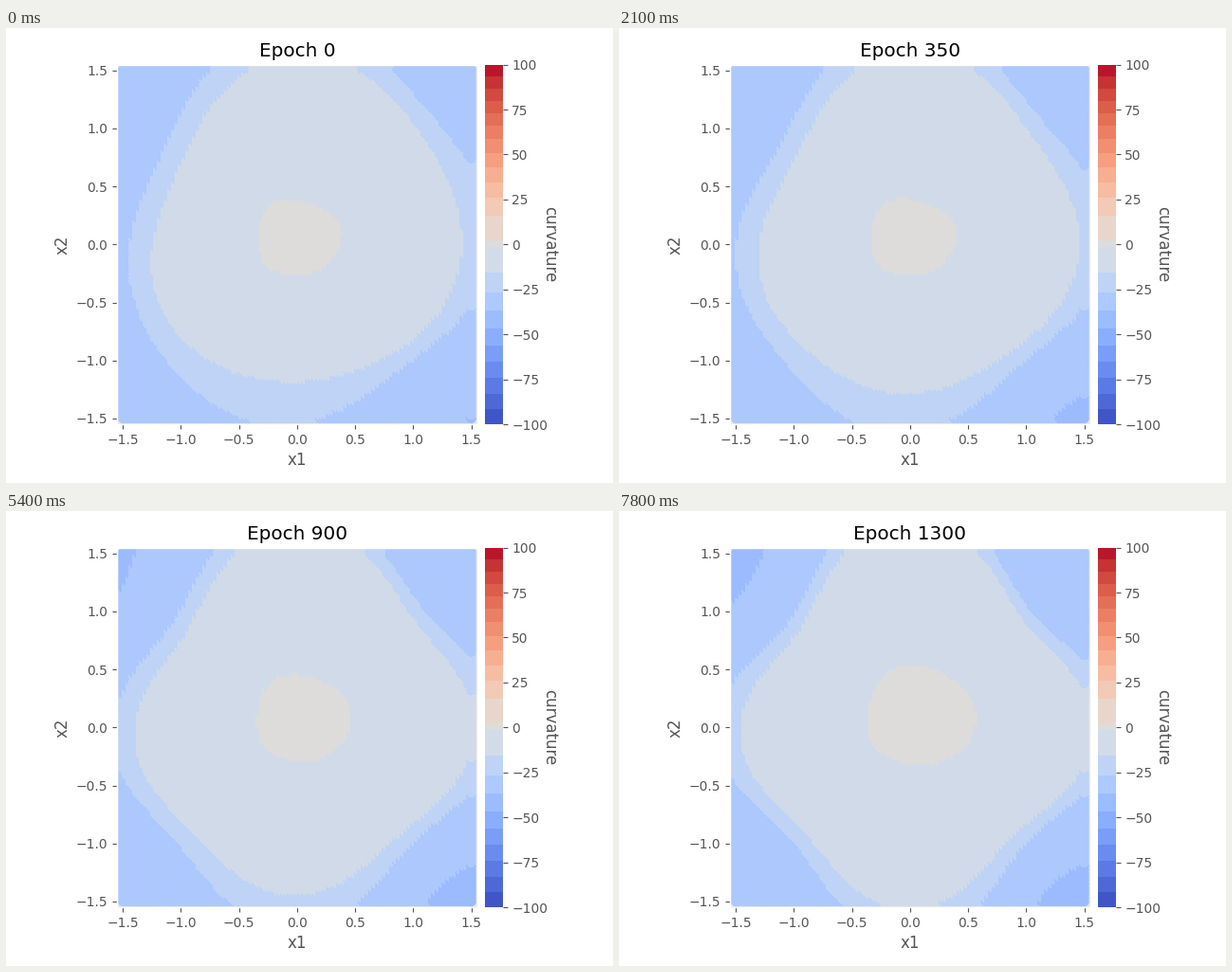
Write a matplotlib script that moves like this. It is 640x480 px and loops after 8 s.

```python
import numpy as np
import matplotlib.pyplot as plt
from matplotlib.animation import FuncAnimation

plt.style.use("ggplot")
plt.rcParams["font.family"] = "DejaVu Sans"

W, H, DPI = 640, 480, 100
CX, CY, UNIT = 306.9, 228.3, 122.4      # plot centre and pixels per data unit
HALF = 1.55 * UNIT
N, RADIUS = 100, 5.2                    # dots per side, dot radius in pixels
LAST_EPOCH = 1300


class Contour:
    """Closed line whose radius is a short Fourier sum that eases from start to end."""

    def __init__(self, start, end, ease):
        self.start, self.end, self.ease = np.array(start), np.array(end), ease

    def radius(self, theta, epoch):
        t = (epoch / LAST_EPOCH) ** self.ease
        terms = self.start + (self.end - self.start) * t
        return sum((c * np.exp(1j * k * theta)).real for k, c in enumerate(terms))


CONTOURS = [
    Contour([41.6, 0.8 - 7.8j, 2.1, 1.8, -1.1 - 1.6j],
            [53.9, 9.9 - 12.2j, 2.3 - 1.2j, 1.8 + 1j, 0.8 - 0.9j], 2),
    Contour([164.2, 8.5 - 17.1j, -4.1 - 5j, 2 + 9.2j, 3.2 - 0.7j],
            [177.3, 4.8 - 7.7j, -9.1 - 1.6j, 2 + 5.2j, 17.8], 1),
    Contour([192, 8 - 12.7j, -8.2 - 7.2j, 7 + 6j, 8 - 0.6j],
            [196.5, 3.6 - 4.2j, -10.7 - 1.2j, 1.8 + 3.2j, 23 - 0.6j], 1),
]

# Colour bands are wider near zero.
CMAP = plt.get_cmap("coolwarm")
above = 2.5 + 97.5 * np.linspace(0, 1, 13) ** 0.8
below = -1.5 - 98.5 * np.linspace(0, 1, 11) ** 0.85
edges = np.concatenate([above[::-1], below])
bands = [(low, high, CMAP(((low + high) / 2 + 100) / 200))
         for high, low in zip(edges, edges[1:])]
ZERO_BAND = len(above) - 1
DOT_COLORS = np.array([color[:3] for _, _, color in bands[ZERO_BAND:ZERO_BAND + 5]])

# Dots are painted column by column, each column from the bottom up.
grid = np.linspace(-1.5, 1.5, N) * UNIT
dot_x = np.repeat(CX + grid, N)
dot_y = np.tile(CY - grid, N)

# Overlap leaves only the lower left of each dot visible.
seen_x, seen_y = dot_x - 3.4, dot_y + 2
theta = np.arctan2(CY - seen_y, seen_x - CX)
dist = np.hypot(seen_x - CX, seen_y - CY)

X0, X1, Y0, Y1 = 115, 498, 37, 420
px, py = np.meshgrid(np.arange(X0, X1) + 0.5, np.arange(Y0, Y1) + 0.5)


def visible_dots():
    """Index of the topmost dot at each pixel, and how much dots cover it."""
    step = grid[1] - grid[0]
    col = np.clip(np.rint((px - CX - grid[0]) / step), 0, N - 1).astype(int)
    row = np.clip(np.rint((CY - py - grid[0]) / step), 0, N - 1).astype(int)
    owner = col * N + row
    gap = np.hypot(px - dot_x[owner], py - dot_y[owner])
    reach = int(RADIUS) + 1
    for i, (x, y) in enumerate(zip(dot_x, dot_y)):
        c, r = int(x) - X0, int(y) - Y0
        box = (slice(max(r - reach, 0), r + reach + 1),
               slice(max(c - reach, 0), c + reach + 1))
        hit = (px[box] - x) ** 2 + (py[box] - y) ** 2 < RADIUS ** 2
        owner[box][hit] = i
    return owner, np.clip(RADIUS - gap + 0.5, 0, 1)


owner, cover = visible_dots()


def in_corner(dx, dy, width, height):
    return (np.maximum(dx, 0) / width) ** 1.3 + (np.maximum(dy, 0) / height) ** 1.3 < 1


def dot_levels(epoch):
    level = sum((dist > line.radius(theta, epoch)).astype(int) for line in CONTOURS)
    size = 58 * (1 - np.exp(-(epoch + 90) / 400))
    level[in_corner(495 - seen_x, 418 - seen_y, size, 0.85 * size)] = 4
    grow = (epoch - 450) / (LAST_EPOCH - 450)
    if grow > 0:
        level[in_corner(seen_x - 117.5, seen_y - 39, 36 * grow, 58 * grow ** 0.3)] = 4
    return level


def field_image(epoch):
    return np.dstack([DOT_COLORS[dot_levels(epoch)][owner], cover])


def pixel_axes(left, width):
    axes = fig.add_axes([left / W, 1 - (CY + HALF) / H, width / W, 2 * HALF / H])
    axes.grid(False)
    return axes


fig = plt.figure(figsize=(W / DPI, H / DPI), dpi=DPI)
ax = pixel_axes(CX - HALF, 2 * HALF)
extent = [(X0 - CX) / UNIT, (X1 - CX) / UNIT, (CY - Y1) / UNIT, (CY - Y0) / UNIT]
field = ax.imshow(field_image(0), extent=extent, aspect="auto", interpolation="nearest")
ax.set(xlim=(-1.55, 1.55), ylim=(-1.55, 1.55), xlabel="x1", ylabel="x2")
ax.set_xticks(np.arange(-1.5, 1.6, 0.5))
ax.set_yticks(np.arange(-1.5, 1.6, 0.5))
title = ax.set_title("Epoch 0")

bar = pixel_axes(504.5, 19)
bar.spines[:].set_visible(False)
for low, high, color in bands:
    bar.axhspan(low, high, facecolor=color, linewidth=0, antialiased=False)
bar.set(xlim=(0, 1), ylim=(-100, 100), xticks=[], yticks=range(-100, 101, 25))
bar.yaxis.tick_right()
fig.text(568.5 / W, 1 - CY / H, "curvature", rotation=270, rotation_mode="anchor",
         ha="center", va="baseline", fontsize=12, color="#555555")


def update(frame):
    epoch = frame // 3 * 50
    field.set_data(field_image(epoch))
    title.set_text(f"Epoch {epoch}")
    return field, title


anim = FuncAnimation(fig, update, frames=80, interval=100, repeat=True, repeat_delay=0)
plt.show()
```
